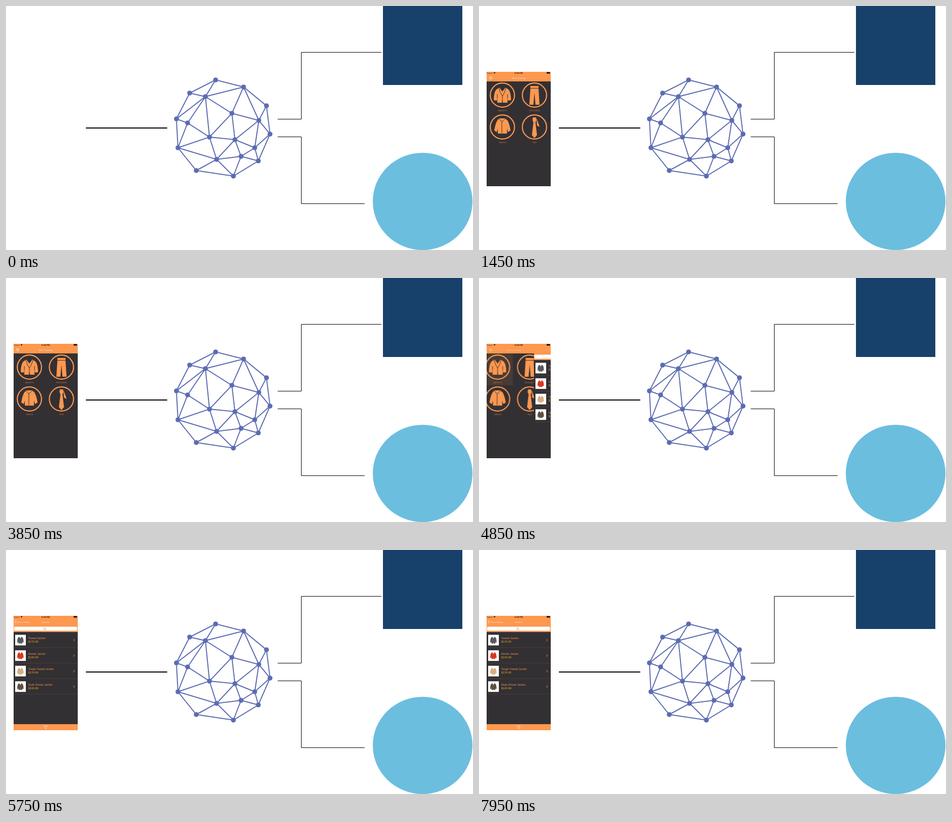
Write an HTML page that moves like this. It is 918 by 482 pixels and loops after 8 s.

```html
<!DOCTYPE html>
<html lang="en">
<head>
<meta charset="utf-8">
<title>Catalog app and services</title>
<style>
  html, body { margin: 0; width: 100%; height: 100%; overflow: hidden; background: #fff; }
  svg { display: block; width: 918px; height: 482px; }
  text { font-family: "Liberation Sans", Arial, sans-serif; }

  .wire { fill: none; stroke: #000; }
  .net { fill: none; stroke: #5c6cb3; stroke-width: 2; }
  .node { fill: #5c6cb3; }
  .bar, .icon { fill: #fd984f; }
  .ring { fill: none; stroke: #fd984f; stroke-width: 2.2; }
  .cut { fill: none; stroke: #333034; stroke-width: 1; }
  .dark { fill: #333034; }
  .label { font-size: 3.9px; fill: #c97a42; text-anchor: middle; }
  .name { font-size: 5.5px; fill: #f08f4c; }
  .price { font-size: 5.5px; fill: #e3ac1d; }
  .title { font-size: 4.4px; fill: #ffe9da; text-anchor: middle; }
  .thin { fill: none; stroke: #fff0e4; stroke-width: .9; }

  .move { animation: 8s step-end infinite; }
  #phone { animation-name: appear; }
  #press { animation-name: press; }
  #home { animation-name: home; }
  #list { animation-name: list; }
  #homeTitle { animation-name: homeTitle; }
  #listTitle { animation-name: listTitle; }
  #menu { animation-name: menu; }
  #back { animation-name: back; }
  #tools { animation-name: tools; }

  @keyframes appear { 0% { opacity: 0 } .625%, 100% { opacity: 1 } }
  @keyframes press { 0% { opacity: 0 } 58.125%, 100% { opacity: 1 } }
  @keyframes list {
    0% { transform: translateX(130px) }
    60.625% { transform: translateX(93px) }
    61.875% { transform: translateX(34px) }
    63.125% { transform: translateX(9px) }
    64.375% { transform: translateX(2px) }
    65.625%, 100% { transform: none }
  }
  @keyframes home {
    0% { transform: none }
    60.625% { transform: translateX(-9.5px) }
    61.875% { transform: translateX(-27px) }
    63.125% { transform: translateX(-35px) }
    64.375%, 100% { transform: translateX(-38px) }
  }
  @keyframes homeTitle {
    0% { transform: none; opacity: 1 }
    60.625% { transform: translateX(-9px); opacity: .6 }
    61.875% { transform: translateX(-28px); opacity: .15 }
    63.125%, 100% { opacity: 0 }
  }
  @keyframes listTitle {
    0% { opacity: 0 }
    60.625% { transform: translateX(58px); opacity: .3 }
    61.875% { transform: translateX(20px); opacity: .7 }
    63.125% { transform: translateX(4px); opacity: .95 }
    64.375%, 100% { transform: none; opacity: 1 }
  }
  @keyframes menu { 0% { opacity: 1 } 60.625% { opacity: .7 } 61.875% { opacity: .2 } 63.125%, 100% { opacity: 0 } }
  @keyframes back { 0% { opacity: 0 } 64.375% { opacity: .5 } 65.625%, 100% { opacity: 1 } }
  @keyframes tools { 0% { opacity: 0 } 66.875%, 100% { opacity: 1 } }
</style>
</head>
<body>
<svg viewBox="0 0 918 482">
  <defs>
    <clipPath id="screen"><rect x="15" y="130" width="126" height="226"/></clipPath>
    <path id="jacket" d="M-6-15 0-7 6-15 12-11Q17-5 17 10L11 11 10 5 10 15H1L0 10-1 15H-10V5L-11 11-17 10Q-17-5-12-11Z"/>
  </defs>

  <path class="wire" stroke-width="2" d="M157 241H317"/>
  <path class="wire" d="M534 223.5H580.5V91.5H738M534 258.5H580.5V390.5H705"/>
  <g id="globe"></g>

  <rect x="741" y="0" width="156" height="156" fill="#17406a"/>
  <ellipse cx="819" cy="386" rx="98" ry="96" fill="#6cbedf"/>

  <g id="phone" class="move" clip-path="url(#screen)">
    <rect class="dark" x="15" y="130" width="126" height="226"/>

    <g id="home" class="move">
      <rect id="press" class="move" x="15" y="149" width="61" height="63" fill="#463b36"/>
      <g id="tiles"></g>
      <g transform="translate(46 176)">
        <use href="#jacket" class="icon"/>
        <path class="cut" d="M-7-14-4-5 0 2 4-5 7-14M0 2V14M-10-2V6M10-2V6"/>
      </g>
      <path class="icon" d="M101 158H117V162H101ZM101 163H117L119 195H111L109 171 107 195H99Z"/>
      <g transform="translate(46 238)">
        <path class="icon" d="M-6-16H5L10-12Q14-5 16 8L11 11 9 4V14H-9V4L-11 11-16 8Q-14-5-10-12Z"/>
        <path class="cut" d="M-6-15-1-9 5-15M-1-9V13"/>
      </g>
      <path class="icon" d="M106 220H112L113 225 111 230 114 255 109 261 104 255 107 230 105 225ZM113 222 118 235 119 239 114 236Z"/>
    </g>

    <g id="list" class="move">
      <rect class="dark" x="15" y="149" width="126" height="207"/>
      <rect class="bar" x="15" y="149" width="126" height="13"/>
      <rect x="16" y="151.5" width="123.5" height="8" rx="1.5" fill="#fff"/>
      <path d="M77.3 156.8 79 158.5" stroke="#999" stroke-width=".8"/>
      <circle cx="76" cy="155.4" r="1.8" fill="none" stroke="#999" stroke-width=".7"/>
      <g id="rows"></g>
    </g>

    <rect class="bar" x="15" y="130" width="126" height="19"/>
    <text x="15" y="133.6" font-size="3.9" fill="#4a2b16">Carrier</text>
    <path d="M28.6 131.3Q30.5 129.8 32.4 131.3L30.5 133.8Z" fill="#3a2110"/>
    <text x="78" y="133.8" font-size="4.2" font-weight="bold" text-anchor="middle" fill="#24150b">8:58 PM</text>
    <path d="M133 130.6H139V131.4H140V132.8H139V133.6H133Z" fill="#111"/>
    <path id="menu" class="thin move" d="M20.5 139.8H25.5M20.5 141.8H25.5M20.5 143.8H25.5"/>
    <text id="homeTitle" class="title move" x="78" y="143.8">Mens Catalog</text>
    <text id="listTitle" class="title move" x="78" y="143.8">Jackets</text>
    <g id="back" class="move">
      <path class="thin" d="M20.5 138.8 17.8 142 20.5 145.2"/>
      <text class="title" x="34.5" y="143.8" style="font-size:4px">Mens Catalog</text>
    </g>

    <g id="tools" class="move">
      <rect class="bar" x="15" y="344" width="126" height="12"/>
      <path class="thin" style="stroke-width:.7" d="M74.5 347.5H81.5L78.7 350.7V353.7L77.3 352.8V350.7Z"/>
    </g>
  </g>
</svg>

<script>
  const put = (id, html) => { document.getElementById(id).innerHTML = html; };

  // Nodes are lettered A to S; each chain of letters is one polyline.
  const nodes = [
    [412, 146], [467, 160], [361, 172], [392, 179], [512, 197], [444, 212], [335, 223],
    [357, 231], [497, 226], [519, 253], [400, 259], [450, 264], [338, 280], [489, 280],
    [414, 303], [462, 297], [496, 306], [374, 325], [447, 336]
  ];
  const chains = "ABEJQSRMGCADC GDBFDHKD GHMKFLKOL EIB FILPNL JINJ NQPOM ROSP".split(" ");
  const trace = chain => "M" + [...chain].map(c => nodes[c.charCodeAt(0) - 65].join(" ")).join("L");
  put("globe", `<path class="net" d="${chains.map(trace).join("")}"/>` +
    nodes.map(([x, y]) => `<circle class="node" cx="${x}" cy="${y}" r="4.8"/>`).join(""));

  put("tiles", ["JACKETS", "TROUSERS", "SHIRTS", "TIES"].map((label, i) => {
    const x = 46 + i % 2 * 63, y = 176 + (i >> 1) * 63;
    return `<circle class="ring" cx="${x}" cy="${y}" r="23.8"/>
      <text class="label" x="${x}" y="${y + 32}">${label}</text>`;
  }).join(""));

  const goods = [
    ["Tweed Jacket", "$179.95", "#58585c"],
    ["Dinner Jacket", "$149.99", "#d8381f"],
    ["Tough Tweed Jacket", "$179.95", "#d6ad85"],
    ["Style Dinner Jacket", "$149.99", "#5d5040"]
  ];
  put("rows", goods.map(([name, price, color], i) => `<g transform="translate(0 ${i * 30.6})">
    <rect x="18" y="167.5" width="21" height="21" fill="#fff"/>
    <use href="#jacket" fill="${color}" transform="translate(28.3 178) scale(.37 .45)"/>
    <text class="name" x="43.7" y="176.2">${name}</text>
    <text class="price" x="43.7" y="183">${price}</text>
    <path d="M132.5 175.8 134.7 178 132.5 180.2" fill="none" stroke="#fd984f" stroke-width=".9"/>
    <path d="M18 192.7H141" stroke="#554539" stroke-width=".6"/></g>`).join(""));
</script>
</body>
</html>
```
